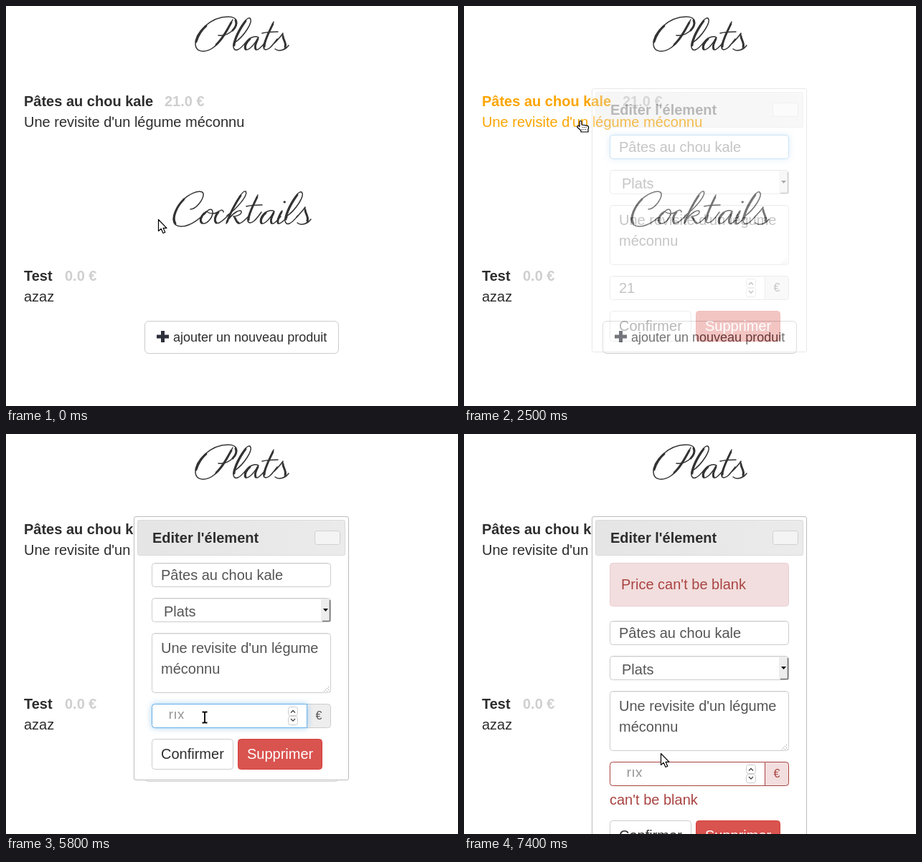
These frames come from a looping animation (630x559 px, 8 s). An HTML page:

```html
<!DOCTYPE html>
<html lang="fr">
<head>
<meta charset="utf-8">
<title>Carte</title>
<style>
html, body { margin: 0; width: 100%; height: 100%; overflow: hidden; background: #fff }
svg { display: block }
text { font: 20px "Liberation Sans", Arial, sans-serif; fill: #2d2d2d; white-space: pre }
.b { font-weight: bold }
.price { fill: #cfcfcf }
.in { fill: #555 }
.box { fill: #fff; stroke: #ccc }
.inset { stroke: #ececec }
.glow { fill: #fff; stroke: #66afe9; filter: drop-shadow(0 0 4px rgba(102,175,233,.6)) }
.err { fill: #a94442 }
.pink { fill: #f2dede }
.hair, .thick { fill: none; stroke: #333; stroke-linecap: round; stroke-linejoin: round }
.hair { stroke-width: 1.5 }
.thick { stroke-width: 2.9 }
.chev { fill: none; stroke: #444; stroke-width: 1.3 }
.ptr { fill: #fff; stroke: #000; stroke-width: 1.2; stroke-linejoin: round }
</style>
</head>
<body>
<svg width="630" height="559" viewBox="0 0 630 559">
  <defs>
    <clipPath id="slot"><path d="M217 387h100v11h-100z"/></clipPath>
    <path id="field" d="M419.5 377.5H207.5a4 4 0 0 0-4 4v25a4 4 0 0 0 4 4H419.5z"/>
    <path id="addon" d="M419.5 377.5h29a4 4 0 0 1 4 4v25a4 4 0 0 1-4 4h-29z"/>
    <linearGradient id="bar"><stop stop-color="#e5e5e5"/><stop offset="1" stop-color="#ebebeb"/></linearGradient>
  </defs>

  <g id="titles"></g>

  <g id="item">
    <text class="b" x="25" y="140">Pâtes au chou kale</text>
    <text x="25" y="169">Une revisite d'un légume méconnu</text>
  </g>
  <text class="b price" x="221" y="140">21.0 €</text>
  <text class="b" x="25" y="384">Test</text>
  <text class="b price" x="82" y="384">0.0 €</text>
  <text x="25" y="413">azaz</text>

  <rect class="box" x="193.5" y="440.5" width="270" height="45" rx="5.5"/>
  <path d="M210 462h17M218.500 454v16" stroke="#2e303c" stroke-width="5"/>
  <text x="233" y="469" style="font-size:18px">ajouter un nouveau produit</text>

  <g id="popup">
    <rect id="frame" x="178.500" y="115.500" width="299" height="368" rx="2.500" fill="#fff" stroke="#bcbcbc"/>
    <rect x="183.500" y="120.500" width="289" height="49" rx="2" fill="url(#bar)" stroke="#dadada"/>
    <text class="b" x="204" y="152">Editer l'élement</text>
    <rect x="430.500" y="135.500" width="35" height="19" rx="3" fill="#f4f4f4" stroke="#d0d0d0"/>

    <g id="alert">
      <rect class="pink" x="203.500" y="180.500" width="249" height="60" rx="4" stroke="#ebccd1"/>
      <text class="err" x="219" y="217">Price can't be blank</text>
    </g>

    <g id="form">
      <rect class="box" x="203.500" y="180.500" width="249" height="33" rx="4"/>
      <path class="inset" d="M206 181.500h244"/>
      <rect id="nameGlow" class="glow" x="203.500" y="180.500" width="249" height="33" rx="4"/>
      <text class="in" x="216" y="204">Pâtes au chou kale</text>
      <path id="nameCaret" d="M216.500 187v20" stroke="#333"/>

      <rect class="box" x="203.500" y="229.500" width="249" height="33" rx="4"/>
      <path class="inset" d="M206 230.500h244"/>
      <path d="M439 231h13v31h-13z" fill="#ededed"/>
      <path d="M451.500 232v30M441 261.500h11" fill="none" stroke="#777" stroke-width="1.600"/>
      <path d="M442 244h7l-3.500 4z"/>
      <text class="in" x="220" y="255">Plats</text>

      <rect class="box" x="203.500" y="278.500" width="249" height="83" rx="4"/>
      <path class="inset" d="M206 279.500h244"/>
      <path d="M443 360l8-8M447 360l4-4M451 360l.5-.5" stroke="#999" stroke-dasharray="1.400"/>
      <text class="in" x="216" y="306">Une revisite d'un légume</text>
      <text class="in" x="216" y="335">méconnu</text>

      <use href="#addon" fill="#eee" stroke="#ccc"/>
      <use href="#field" class="box"/>
      <path class="inset" d="M206 378.500h213"/>
      <use href="#field" id="priceGlow" class="glow"/>
      <g id="priceErr">
        <use href="#addon" class="pink" stroke="#a94442"/>
        <use href="#field" fill="#fff" stroke="#a94442"/>
      </g>
      <text id="euro" class="in" x="431.500" y="399" style="font-size:16px">€</text>
      <text id="value" class="in" x="216" y="401"></text>
      <g clip-path="url(#slot)"><text id="hint" x="226.500" y="399" fill="#999" style="fill:#999">rıx</text></g>
      <path id="priceCaret" d="M.5 384v20" stroke="#333"/>
      <rect class="box" x="393.500" y="381.500" width="13" height="12" rx="3"/>
      <rect class="box" x="393.500" y="394.500" width="13" height="12" rx="3"/>
      <path class="chev" d="M397 389.500l3-3 3 3M397 398l3 3 3-3"/>

      <g id="actions">
        <text id="help" class="err" x="203" y="404">can't be blank</text>
        <rect id="ok" x="203.500" y="426.500" width="113" height="42" rx="4"/>
        <text x="216" y="454">Confirmer</text>
        <rect id="del" x="323.500" y="426.500" width="117" height="42" rx="4"/>
        <text x="336" y="454" style="fill:#fff">Supprimer</text>
      </g>
    </g>
  </g>

  <g id="cursor">
    <path id="arrow" class="ptr" d="M.5.5v16l3.700-3.200 2.800 6.200 2.800-1.200-2.700-6H12z"/>
    <g id="hand">
      <path class="ptr" d="M-2 2C-2 0 1 0 1 2v4l7.500 1.200C11 7.800 11 10 10 12.500V16H0v-2l-5-4.500C-6 7.500-3.500 6.500-2 8.500z"/>
      <path d="M1.500 9.500h7M1 12.500h7" stroke="#000" stroke-dasharray="1 1.500"/>
    </g>
    <g id="beam" fill="none">
      <path d="M-4-7.500h3l1 1 1-1h3M-4 7.500h3l1-1 1 1h3M0-7V7" stroke="#fff" stroke-width="4"/>
      <path d="M-3.500-7.500h2.500l1 1 1-1h2.500M-3.500 7.500h2.500l1-1 1 1h2.500M0-7V7" stroke="#000" stroke-width="1.800"/>
    </g>
  </g>
</svg>
<script>
const $ = id => document.getElementById(id);
const clamp = v => Math.max(0, Math.min(1, v));
const show = (id, on) => $(id).style.opacity = +on;

// Script lettering: [hairline, heavy strokes]
const glyphs = {
  P: ["M316 19C308 34 300 50 289 58S265 65 264 54C263 38 284 15 310 15C323 15 325 25 317 33C311 39 303 42 296 41",
      "M314 23C307 36 301 47 293 54M265 50C268 41 273 33 279 28M320 20C322 25 320 30 316 34"],
  l: ["M319 51C332 42 345 22 340 17C335 14 322 36 318 49C315 58 318 63 323 61C328 59 331 54 335 50",
      "M334 21C327 31 319 45 318 55"],
  a: ["M352 44C346 40 336 46 333 54C331 62 335 63 340 59C346 54 350 47 352 44C349 50 345 58 348 61C351 63 357 56 361 51",
      "M340 46C335 50 332 57 334 60M351 46C348 52 346 57 348 60"],
  t: ["M373 22C368 34 360 48 359 55C358 62 363 62 367 59C371 56 375 50 378 46M357 38C365 36 371 36 379 36",
      "M372 25C367 36 360 48 360 57"],
  s: ["M374 52C380 46 384 41 386 38C384 46 391 50 390 56C389 62 380 64 375 60M382 62C387 62 391 59 394 55",
      "M386 42C386 47 391 51 389 57"],
  C: ["M257 284C265 284 276 270 275 262C272 255 252 262 241 278C230 294 230 308 244 308C256 308 268 299 277 290",
      "M248 270C238 280 231 295 236 304"],
  o: ["M277 291C281 284 287 282 288 287C289 295 281 304 275 304C268 304 270 293 279 287C285 291 290 291 295 288",
      "M276 290C271 295 270 301 273 303"],
  c: ["M303 288C303 283 296 285 292 293C289 301 292 305 297 303C303 300 307 295 311 291",
      "M296 288C291 294 290 300 293 303"],
  k: ["M308 293C322 283 338 264 334 259C329 257 315 282 307 304M311 297C318 288 326 284 328 287C329 292 320 294 317 294C321 296 320 304 325 304C330 303 335 297 339 293",
      "M327 265C319 277 312 291 308 302M319 296C321 299 321 302 324 303"],
  i: ["M385 286C381 292 377 300 379 304C382 306 388 299 392 295",
      "M384 288C381 293 378 299 379 303M388 274h.5"]
};
const words = [["Plats"], ["Cock"], ["t", -22, 242], ["a", 22, 243], ["i"], ["l", 72, 243], ["s", 31, 243]];
$("titles").innerHTML = words.map(([word, x = 0, y = 0]) =>
  `<g transform="translate(${x} ${y})">` + [...word].map(ch =>
    `<path class="hair" d="${glyphs[ch][0]}"/><path class="thick" d="${glyphs[ch][1]}"/>`).join("") + "</g>").join("");

// Pointer path: time, x, y
const path = [
  [100, 212, 298], [500, 184, 238], [600, 184, 238], [1000, 171, 184], [1400, 163, 160],
  [3300, 163, 160], [3400, 181, 173], [3800, 274, 300], [4100, 273, 392],
  [5700, 273, 392], [5800, 277, 396], [6100, 332, 444], [6400, 274, 446]
];
function pointer(t) {
  const n = path.findIndex(p => p[0] > t);
  if (n == 0) return path[0].slice(1);
  if (n < 0) return path.at(-1).slice(1);
  const [t0, x0, y0] = path[n - 1], [t1, x1, y1] = path[n];
  const f = (t - t0) / (t1 - t0);
  return [Math.round(x0 + (x1 - x0) * f), Math.round(y0 + (y1 - y0) * f)];
}

function draw(now) {
  const t = Math.floor(now % 8000 / 100) * 100;
  const [x, y] = pointer(t);
  const open = t >= 2500, failed = t >= 7200;
  const within = (l, top, r, b) => x >= l && x <= r && y >= top && y <= b;

  const onItem = t < 3500 && y < 186;
  const onOk = open && !failed && within(203, 426, 317, 469);
  const onDel = open && !failed && within(323, 426, 441, 469);
  const onText = t >= 3500 && !failed &&
    (within(203, 180, 453, 214) || within(203, 278, 453, 362) || within(203, 377, 392, 411));
  const kind = onItem || onOk || onDel || t == 7200 ? "hand" : onText ? "beam" : "arrow";
  for (const id of ["hand", "beam", "arrow"]) show(id, id == kind);
  $("cursor").setAttribute("transform", `translate(${x} ${y})`);

  for (const el of $("item").children) el.style.fill = onItem ? "#fba500" : "";
  const paint = (id, fill, stroke) => { $(id).style.fill = fill; $(id).style.stroke = stroke; };
  paint("ok", onOk ? "#e6e6e6" : "#fff", onOk ? "#adadad" : "#ccc");
  paint("del", onDel ? "#c9302c" : "#d9534f", onDel ? "#ac2925" : "#d43f3a");

  show("popup", clamp((t - 2400) / 300));
  const focus = clamp((t - 4200) / 200), fail = clamp((t - 7100) / 200);
  show("nameGlow", 1 - focus);
  show("priceGlow", focus * (1 - fail));
  show("priceErr", fail);
  show("nameCaret", t >= 2600 && t < 4300);

  const value = t < 5100 ? "21" : t < 5400 ? "2" : "";
  $("value").textContent = value;
  show("hint", !value);
  show("priceCaret", t >= 4300 && t < 5500 || t >= 6700 && !failed);
  $("priceCaret").setAttribute("transform", `translate(${216 + value.length * 11})`);

  show("alert", failed);
  show("help", failed);
  $("euro").style.fill = failed ? "#a94442" : "";
  $("form").setAttribute("transform", `translate(0 ${failed ? 81 : 0})`);
  $("actions").setAttribute("transform", `translate(0 ${failed ? 33 : 0})`);
  $("frame").setAttribute("height", failed ? 482 : 368);
  requestAnimationFrame(draw);
}
requestAnimationFrame(draw);
</script>
</body>
</html>
```
